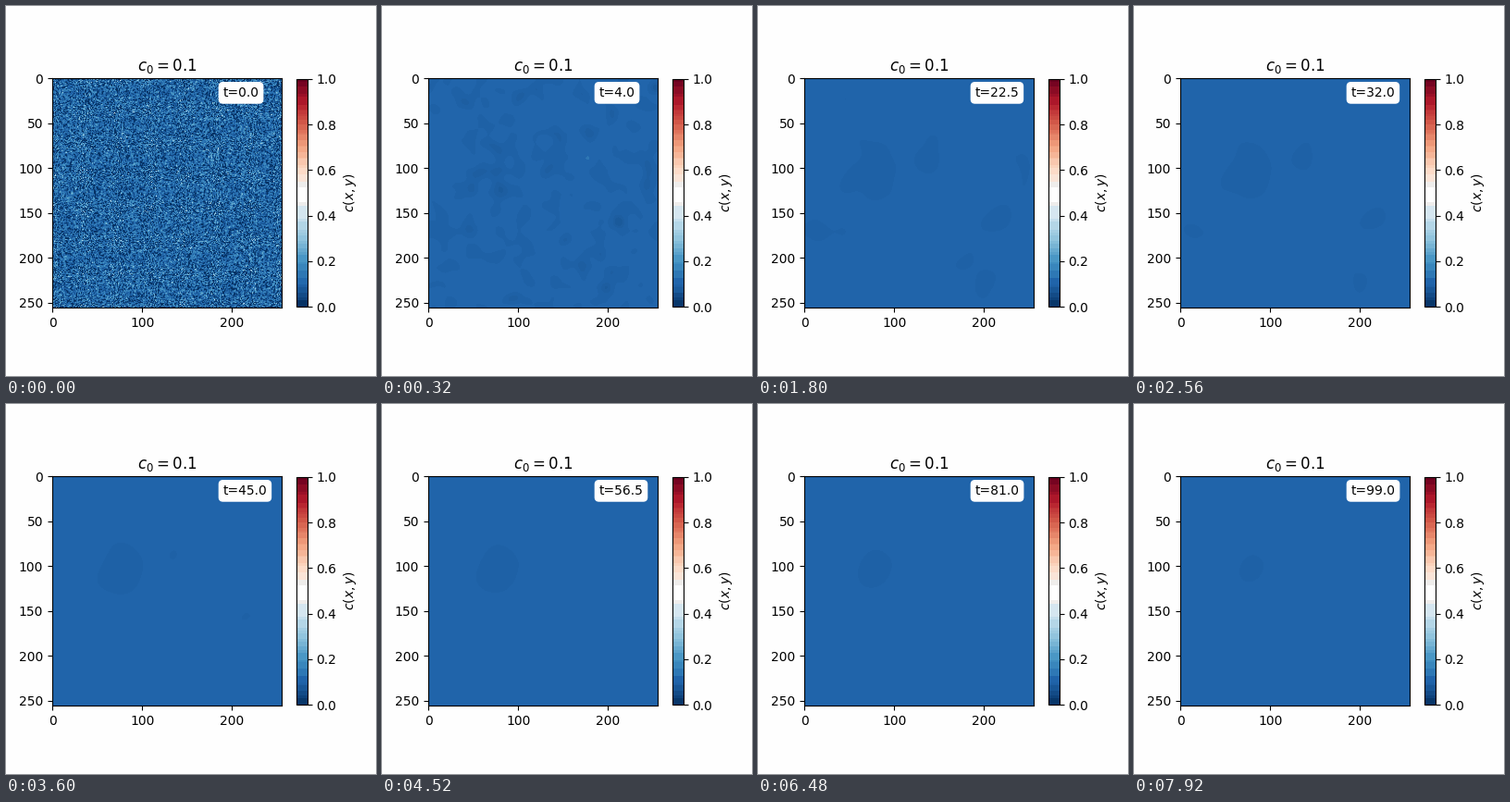
Write a matplotlib script that moves like this. It is 400x400 px and loops after 7.96 s.

```python
import numpy as np
import matplotlib.pyplot as plt
from matplotlib.animation import FuncAnimation
from matplotlib.colors import ListedColormap

# Cahn-Hilliard equation with f(c) = W c^2 (1-c)^2, semi-implicit Fourier scheme
W, M, KAPPA = 2.0, 1.0, 0.5
C0, NOISE = 0.1, 0.1
N, LENGTH = 256, 64 * np.pi
DT, STRIDE, FRAMES = 0.1, 5, 199
PAPER = "#fefefe"


def simulate():
    rng = np.random.default_rng(12345)
    c = C0 + NOISE * rng.standard_normal((N, N))
    dx = LENGTH / N
    kx = 2 * np.pi * np.fft.fftfreq(N, dx)[:, None]
    ky = 2 * np.pi * np.fft.rfftfreq(N, dx)[None, :]
    k2 = kx**2 + ky**2
    cut = kx.max() * 2 / 3
    drive = DT * M * k2 * ((abs(kx) < cut) & (abs(ky) < cut))
    damp = 1 / (1 + DT * M * KAPPA * k2**2)

    fields = np.empty((FRAMES, N, N), np.float32)
    fields[0] = c
    c_hat = np.fft.rfft2(c)
    for step in range(1, (FRAMES - 1) * STRIDE + 1):
        slope = 2 * W * c * (1 - c) * (1 - 2 * c)
        c_hat = (c_hat - drive * np.fft.rfft2(slope)) * damp
        c = np.fft.irfft2(c_hat, s=(N, N))
        if step % STRIDE == 0:
            fields[step // STRIDE] = c
    return fields


# Colours are merged in cells of 32 x 16 x 32, each shown as its mean
RGB = plt.get_cmap("RdBu_r")(np.arange(256), bytes=True)[:, :3].astype(int)
CELL = (RGB[:, 0] >> 5) * 128 + (RGB[:, 1] >> 4) * 8 + (RGB[:, 2] >> 5)
GROUP = np.unique(CELL, return_inverse=True)[1].ravel()
WHITE = CELL == 7 * 128 + 15 * 8 + 7


def merged_cmap(field):
    levels = np.clip(field * 256, 0, 255).astype(int)
    weight = np.bincount(levels.ravel(), minlength=256) + 12.0
    total = np.bincount(GROUP, weight)
    means = [np.bincount(GROUP, weight * RGB[:, k]) / total for k in range(3)]
    rgb = np.floor(np.stack(means, axis=1) + 1e-6)[GROUP]
    rgb[WHITE] = 254
    return ListedColormap((rgb + 0.25) / 255)


fields = simulate()

fig, ax = plt.subplots(figsize=(4, 4), dpi=100, facecolor=PAPER)
im = ax.imshow(fields[0], cmap=merged_cmap(fields[0]), vmin=0, vmax=1)
fig.colorbar(im, ax=ax, label=r"$c(x,y)$", shrink=0.8)
ax.set_title(rf"$c_0={C0:.1f}$")
clock = ax.text(190, 20, "t=0.0",
                bbox=dict(boxstyle="round", ec=PAPER, fc=PAPER))


def update(i):
    im.set_data(fields[i])
    im.set_cmap(merged_cmap(fields[i]))
    clock.set_text(f"t={i * STRIDE * DT:.1f}")
    return im, clock


anim = FuncAnimation(fig, update, frames=FRAMES, interval=40,
                     repeat=True, repeat_delay=0)
plt.show()
```
